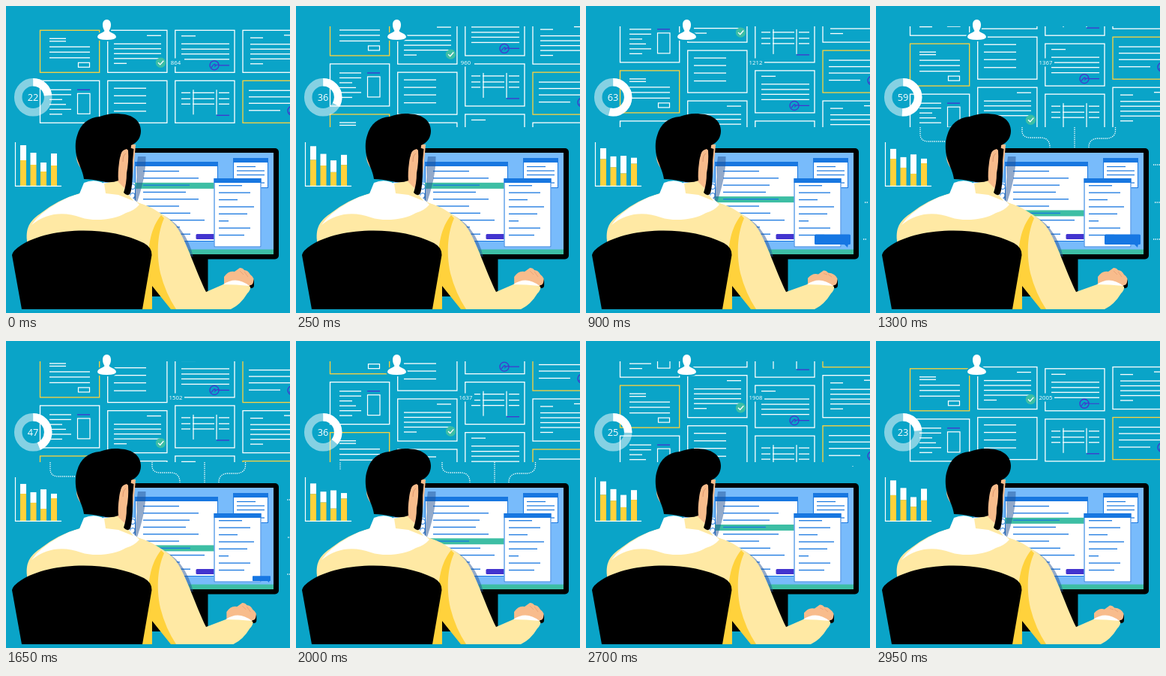
Animation, 379 px wide and 408 px high, one loop 3 s. Source, as an HTML page with a canvas:

```html
<!DOCTYPE html>
<html lang="en">
<head>
<meta charset="utf-8">
<title>Office dashboard</title>
<style>
html, body { margin: 0; width: 100%; height: 100%; overflow: hidden; background: #0aa4c8; }
canvas { display: block; width: 379px; height: 408px; }
</style>
</head>
<body>
<canvas id="stage"></canvas>
<script>
const W = 379, H = 408, LOOP = 3000, STEP = 50;
const BG = '#0aa4c8', WHITE = '#fff', BLACK = '#000', YELLOW = '#ffd23c', CREAM = '#ffe9a4',
  SKIN = '#f8bc8c', BLUE = '#1877e0', SKY = '#78bbfb', TEAL = '#3dbea4', PURPLE = '#4334cf';
const FONT = '"Open Sans", "Noto Sans", sans-serif';

const canvas = document.getElementById('stage');
const ctx = canvas.getContext('2d');
const dpr = window.devicePixelRatio || 1;
canvas.width = W * dpr;
canvas.height = H * dpr;

function rect(x, y, w, h, color) {
  ctx.fillStyle = color;
  ctx.fillRect(x, y, w, h);
}

function round(x, y, w, h, r, color) {
  ctx.fillStyle = color;
  ctx.beginPath();
  ctx.roundRect(x, y, w, h, r);
  ctx.fill();
}

function shape(d, color) {
  ctx.fillStyle = color;
  ctx.fill(new Path2D(d));
}

function trace(d, color, width) {
  ctx.strokeStyle = color;
  ctx.lineWidth = width;
  ctx.stroke(new Path2D(d));
}

function disc(x, y, r, color) {
  ctx.fillStyle = color;
  ctx.beginPath();
  ctx.arc(x, y, r, 0, Math.PI * 2);
  ctx.fill();
}

function circle(x, y, r, color, width) {
  ctx.strokeStyle = color;
  ctx.lineWidth = width;
  ctx.beginPath();
  ctx.arc(x, y, r, 0, Math.PI * 2);
  ctx.stroke();
}

function frame(x, y, w, h, color, width = 1.3) {
  ctx.strokeStyle = color;
  ctx.lineWidth = width;
  ctx.strokeRect(x, y, w, h);
}

const hline = (x1, x2, y, color = WHITE, w = 1.3) => rect(x1, y - w / 2, x2 - x1, w, color);
const rows = (x1, x2, ys, color, w) => ys.forEach(y => hline(x1, x2, y, color, w));

function label(text, x, y, size) {
  ctx.fillStyle = WHITE;
  ctx.font = `${size}px ${FONT}`;
  ctx.textAlign = 'center';
  ctx.fillText(text, x, y);
}

const clamp = v => Math.max(0, Math.min(1, v));
const ramp = (t, a, b) => clamp((t - a) / (b - a));
const ease = v => v * v * (3 - 2 * v);
const mix = (a, b, p) => a + (b - a) * p;

// Smooth curve through [time, value] points
function curve(keys, t) {
  const n = keys.length;
  let i = 0;
  while (i < n - 2 && t >= keys[i + 1][0]) i++;
  const [t0, v0] = keys[i], [t1, v1] = keys[i + 1];
  const slope = k => {
    const a = keys[Math.max(0, k - 1)], b = keys[Math.min(n - 1, k + 1)];
    return (b[1] - a[1]) / (b[0] - a[0]);
  };
  const h = t1 - t0, p = (t - t0) / h, q = 1 - p;
  return v0 * q * q * (1 + 2 * p) + slope(i) * h * p * q * q
    + v1 * p * p * (3 - 2 * p) - slope(i + 1) * h * p * p * q;
}

// Cards: content is drawn relative to the card's top edge
function seal(x, y) {
  circle(x, y, 6, PURPLE, 1.3);
  trace(`M${x - 4} ${y + 3}Q${x + 2} ${y - 5} ${x + 1} ${y + 1}Q${x + 4} ${y - 2} ${x + 7} ${y}H${x + 20}`, PURPLE, 1.2);
}

function formCard() {
  rows(58, 80, [11, 14.5]);
  rows(58, 112, [22, 29, 36.5]);
  frame(96.5, 43, 15, 6, WHITE, 1.2);
}

function sheetCard() {
  hline(95, 112, 12, PURPLE);
  rows(58, 87, [12, 18.5, 38]);
  rows(58, 75, [25, 44.5]);
  hline(58, 80, 31.5);
  frame(95.5, 17, 16.5, 27, WHITE, 1.2);
}

function checkCard() {
  hline(188, 207, 7);
  rows(144, 207, [18, 24.5, 31, 37.5]);
  hline(144, 161, 44);
  disc(206.5, 43, 6.7, TEAL);
  trace('M203 43L205.7 45.6L210.3 40.4', WHITE, 1.3);
}

function textCard() {
  rows(144, 187, [10, 20, 30, 40.5]);
}

function signCard() {
  hline(234, 253, 7.5);
  rows(234, 298, [18, 25, 31.5, 38.5]);
  seal(278, 46.5);
}

function tableCard() {
  [250, 281].forEach(x => rect(x - 0.6, 12, 1.2, 33, WHITE));
  [16, 24, 31].forEach(y => {
    hline(234, 246, y);
    hline(249, 278, y);
    hline(284, 298, y);
  });
  hline(281, 298, 46, PURPLE);
}

function noteCard() {
  hline(371, 390, 6.5);
  hline(326, 343, 10);
  rows(326, 390, [18.5, 25, 31.5, 38]);
  hline(326, 343, 44.5);
}

function dealCard() {
  rows(324, 390, [13, 21.5, 30]);
  hline(324, 366, 39.5);
  seal(382, 40);
}

const columns = [
  { x: 45.5, turns: 2, cards: [[YELLOW, formCard], [WHITE, sheetCard]] },
  { x: 135.7, turns: 1, cards: [[WHITE, checkCard], [WHITE, textCard]] },
  { x: 225.8, turns: 2, cards: [[WHITE, signCard], [WHITE, tableCard]] },
  { x: 316, turns: 1, cards: [[WHITE, noteCard], [YELLOW, dealCard]] }
];

function cards(t) {
  const pitch = 67;
  ctx.save();
  ctx.beginPath();
  ctx.rect(0, 27, W, 134);
  ctx.clip();
  for (const { x, turns, cards } of columns) {
    const shift = (t / LOOP * turns % 1) * pitch * 2;
    for (let k = 0; k < 4; k++) {
      const [color, body] = cards[k % 2];
      ctx.save();
      ctx.translate(0, 32.3 + k * pitch - shift);
      frame(x, 0, 79.2, 56, color);
      body();
      ctx.restore();
    }
  }
  ctx.restore();
}

function avatar() {
  const d = 'M134.500 18C138 18 140 21 140 25C140 29 138.500 31 137.500 33C139 36 146 36 147 41Q147 45 134.500 45T122 41C123 36 130 36 131.500 33C130.500 31 129 29 129 25C129 21 131 18 134.500 18Z';
  trace(d, BG, 4);
  shape(d, WHITE);
}

function counter(t) {
  rect(216, 69.5, 22, 11, BG);
  label(Math.floor(864.15 + 0.38685 * t), 226.5, 78, 7.8);
}

const ringCount = [[0, 22.3], [500, 49.3], [900, 63.2], [1050, 64.5], [1300, 59.4],
  [2000, 36.4], [2450, 28.4], [2950, 23.1], [3000, 22.3]];
const ringArc = [[0, 0.23], [500, 0.43], [900, 0.54], [1300, 0.51], [2000, 0.36], [2450, 0.28], [3000, 0.23]];

function ring(t) {
  const arc = (part, color) => {
    ctx.strokeStyle = color;
    ctx.lineWidth = 10.5;
    ctx.beginPath();
    ctx.arc(36.2, 121.3, 20, -Math.PI / 2, Math.PI * (part * 2 - 0.5));
    ctx.stroke();
  };
  arc(1, 'rgba(255,255,255,.5)');
  arc(curve(ringArc, t), WHITE);
  label(Math.floor(curve(ringCount, t)), 36, 126, 12.8);
}

// x, top and split at rest, top and split at the peak
const bars = [
  [19, 185, 205, 190, 203],
  [32.5, 195, 211, 201, 215],
  [46, 208, 220, 197, 223],
  [60, 196, 212, 203, 209]
];

function chart(t) {
  const p = Math.sin(Math.PI * t / LOOP);
  for (const [x, top, split, top2, split2] of bars) {
    const a = mix(top, top2, p), b = mix(split, split2, p);
    rect(x, a, 8, b - a, WHITE);
    rect(x, b, 8, 239 - b, YELLOW);
  }
  trace('M12.500 181V239.300H74', WHITE, 1.2);
}

// path, length, reveal start, erase start
const wires = [
  ['M92 180H70Q59 180 59 170V161', 48, 950, 1800],
  ['M195 161V166Q195 175 206 175H221Q232 176 232 188', 60, 1000, 2050],
  ['M265 161V188', 27, 1000, 2050],
  ['M319.500 161V166Q319 175 308 176H295Q284 177 284 188', 60, 1000, 2050],
  ['M370 211H379', 9, 1000, 1500],
  ['M372 261H379', 7, 800, 1500],
  ['M370 310H379', 9, 800, 1500],
  ['M356 161V167', 6, 2250, 2480]
];

function dots(t) {
  ctx.save();
  ctx.strokeStyle = WHITE;
  ctx.lineWidth = 1.3;
  for (const [d, len, on, off] of wires) {
    const from = len * ramp(t, off, off + 250), to = len * ramp(t, on, on + 200);
    if (to <= from) continue;
    const dash = [0, from];
    for (let s = from; s < to; s += 2.6) dash.push(1.3, 1.3);
    dash.push(0, 200);
    ctx.setLineDash(dash);
    ctx.stroke(new Path2D(d));
  }
  ctx.restore();
}

function panel(x, y, w, h, bar) {
  rect(x, y, w, h, WHITE);
  rect(x, y, w, bar, BLUE);
  frame(x + 0.5, y + 0.5, w - 1, h - 1, BLUE, 1);
}

// time, highlighted row
const marks = [[0, 0], [300, -1], [600, 0], [700, 1], [800, 2], [1100, 3], [1250, 4],
  [1700, 3], [2200, 2], [2550, 1], [2800, 0]];

function bubble(t) {
  const grow = t < 500 ? 1.13 * ease(ramp(t, 300, 500)) : mix(1.13, 1, ease(ramp(t, 500, 700)));
  const s = grow * (1 - ease(ramp(t, 1550, 1750)));
  if (s <= 0) return;
  ctx.save();
  ctx.translate(353, 321);
  ctx.scale(s, s);
  round(-48, -17.5, 48, 13.5, 1.5, '#1677e3');
  shape('M-9 -5H-3L-4 0Z', '#1677e3');
  ctx.restore();
}

function monitor(t) {
  rect(195, 334, 74.5, 52, BLACK);
  round(130, 189, 234, 147.5, 5, BLACK);
  rect(130, 195, 227, 135, SKY);
  rect(130, 323.5, 227, 6.5, TEAL);

  panel(303, 202, 47, 40, 6);
  hline(308, 333, 213.5, BLUE, 1.2);
  rows(308, 345, [219, 224.5, 235], BLUE, 1.2);
  hline(308, 338, 230, BLUE, 1.2);

  rect(130, 235, 48, 78, WHITE);
  panel(172, 207, 111, 106, 6);
  const row = marks.filter(m => m[0] <= t).pop()[1];
  rect(172, 234.8 + row * 9.15, 106, 8, TEAL);
  const ends = [231, 257, 245, 240, 257, 231, 246, 265, 232, 246];
  ends.forEach((x, i) => hline(183, x, 219.5 + i * 9.3, BLUE, 1.3));
  round(253.5, 303, 27, 7, 1.5, PURPLE);

  panel(277.5, 229, 63, 91.5, 6);
  const sideEnds = [315, 326, 309, 331, 322, 297, 326, 318];
  sideEnds.forEach((x, i) => hline(284, x, 238.7 + i * 9.4, BLUE, 1.3));
  bubble(t);

  [240, 252].forEach(y => circle(169, y, 3.5, BLUE, 1));
  const shade = 'rgba(36,84,150,.5)';
  shape('M176 200H186.500Q187 228 173 266L168 262Q176 240 174 215Z', shade);
  shape('M204 276Q238 288 250 333H230Z', shade);
}

function arm(t) {
  const dx = 5 * ease(ramp(t, 200, 650)) - 5 * ease(ramp(t, 1400, 2050));
  const press = ramp(t, 250, 400) - ramp(t, 1100, 1250) + ramp(t, 2600, 2750);
  const dy = 3.5 * ease(clamp(press));
  const X = x => x + dx;

  round(X(318), 362, 13, 13, 4, BLACK);
  shape(`M${X(291)} 370L${X(291)} ${360 + dy * 0.5}Q${X(297)} ${351 + dy} ${X(305)} ${353 + dy}
    L${X(312)} ${348 + dy}Q${X(316)} ${348 + dy} ${X(318)} ${351 + dy}Q${X(323)} ${351 + dy} ${X(326)} 357
    Q${X(332)} 361 ${X(330)} 367Q${X(329)} 371 ${X(326)} 371L${X(318)} 378Z`, SKIN);
  trace(`M${X(312)} ${352 + dy}L${X(317)} 357M${X(318)} ${353 + dy}L${X(323)} 360`, '#e29c72', 0.7);
  shape(`M178 262Q216 277 228 294C241 313 253 352 267 380L${X(290)} 370
    Q${X(308)} 362 ${X(326)} 373Q${X(327)} 377 ${X(322)} 382
    Q${X(313)} 397 ${X(300)} 403H221L193 366Z`, CREAM);
  shape(`M${X(290)} 370Q${X(307)} 358 ${X(325)} 372Q${X(307)} 370 ${X(290)} 370Z`, WHITE);
}

function body() {
  shape('M28 312C26 292 34 284 47 275Q70 257 97 249.500L130 237L178 262Q201 269 209 280L195 330V403H30Z', CREAM);
  shape('M193 330Q197 350 195 372V403H170V330Z', YELLOW);
  shape('M207 278C193 295 190 318 189 345L195 372L220 403H227Q213 382 206 355C200 326 203 300 211 282Z', YELLOW);
  shape('M34 291Q46 274 70 261Q86 252 98 249.500L104 235Q118 229 131 236L146 247L165 251L178 264Q171 272 160 275C145 284 118 287 100 281C78 273 55 274 34 291Z', WHITE);
  shape('M131 236L150 231L163 250L170 259L150 251L133 249Z', CREAM);
}

function head() {
  shape('M95 195Q92 203 98 213L105 220V195Z', SKIN);
  shape('M148 184H173L172 196L169 225L160 244L146 230Z', SKIN);
  shape('M104 230C103 221 98 212 95 203C92 192 92 180 95 172C99 157 110 148 125 147C133 144 143 142 153 143.500C169 144 180 153 180 166C180 175 175 182 167 185C167 192 164 193 161 190C155 191 152 199 151 208Q149 222 150 232Q140 236 128 233Q114 230 104 230Z', BLACK);
  shape('M161 187L170.500 190Q168.500 205 169 218Q169 238 166 249Q162 254 157 248Q161 236 161 222Q164 207 163 192Z', BLACK);
  shape('M153 201Q153 192 159 191Q164 194 162 206Q160 220 153 226Q149 216 153 201Z', SKIN);
  trace('M156 207Q156 198 160 196', '#d98f68', 0.8);
}

function chair() {
  shape('M8 331Q9 325 20 318C56 294 137 291 184 315Q195 321 194.500 331L182 403H21Z', BLACK);
}

function draw(t) {
  ctx.setTransform(dpr, 0, 0, dpr, 0, 0);
  rect(0, 0, W, H, BG);
  cards(t);
  avatar();
  counter(t);
  ring(t);
  chart(t);
  dots(t);
  monitor(t);
  arm(t);
  body();
  chair();
  head();
}

const start = performance.now();
function tick(now) {
  const t = Math.max(0, now - start) % LOOP;
  draw(Math.floor(t / STEP) * STEP);
  requestAnimationFrame(tick);
}
draw(0);
requestAnimationFrame(tick);
</script>
</body>
</html>
```
